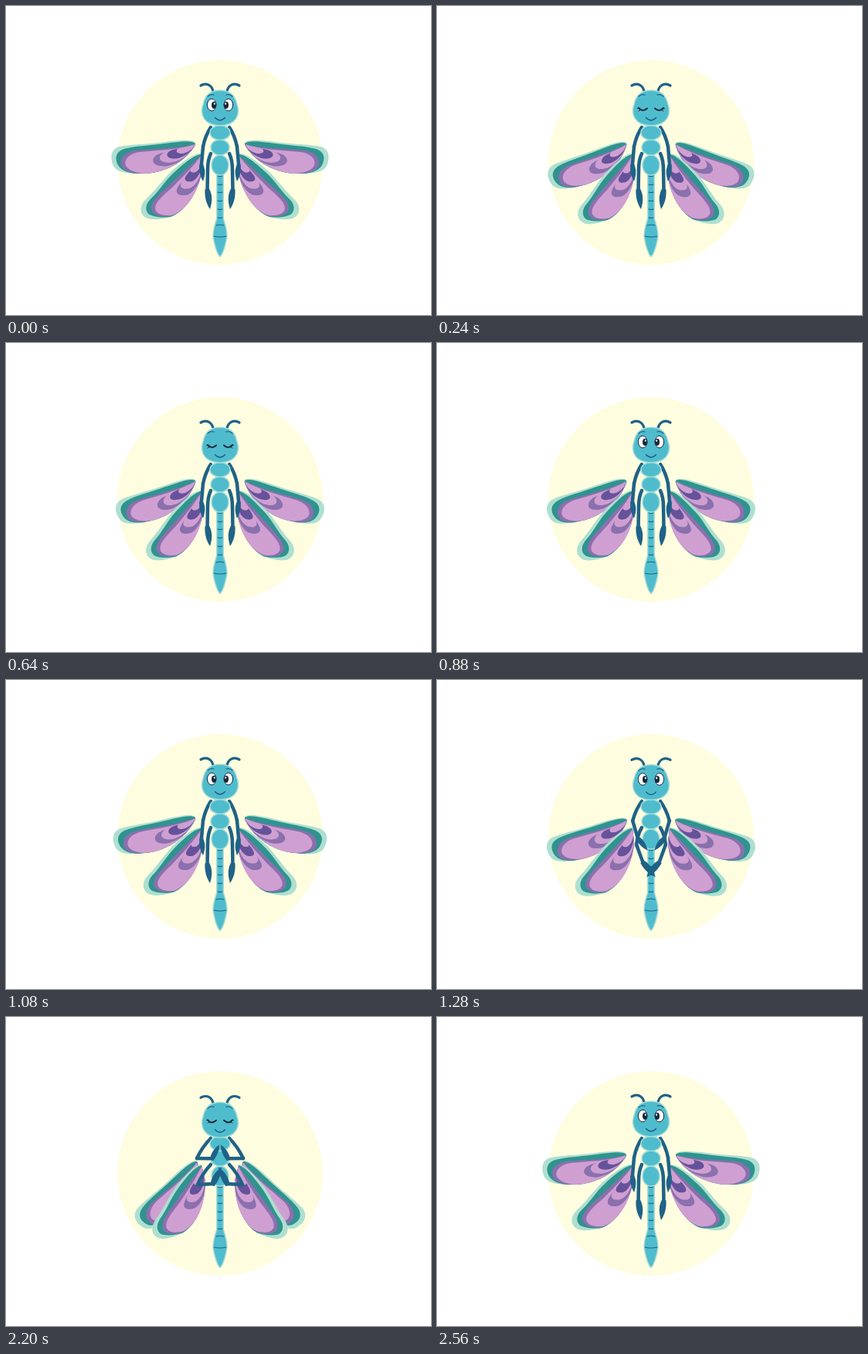
These frames come from a looping animation (550 px wide and 400 px high, 2.6 s). An HTML page with a canvas:

```html
<!DOCTYPE html>
<html>
<head>
<meta charset="utf-8">
<style>
html, body { margin: 0; width: 100%; height: 100%; overflow: hidden; background: #fff; }
canvas { display: block; }
</style>
</head>
<body>
<canvas id="stage" width="550" height="400"></canvas>
<script>
const ctx = document.getElementById('stage').getContext('2d');
const LOOP = 2600, STEP = 40, FLAP = 380, CLOSE = 1140, REST = 1600, OPEN = 2200;
const BLUE = '#4fbccd', PALE = '#a6dcd6', NAVY = '#1f6287', INK = '#17283c';
const MINT = '#aedfd0', TEAL = '#2f938f', MAUVE = '#8a70ad', LILAC = '#cf9fd2', VIOLET = '#66529a';

// Left wings; each is a stack of layers that share a root.
const upperWing = {
  root: [245, 178],
  layers: [
    [MINT, 'M245 177C240 172 222 174 205 176C185 179 160 179 147 182C134 186 135 198 139 207C143 215 157 217 170 217L182 217C210 215 234 199 245 180Z'],
    [TEAL, 'M245 178C239 173 224 176 205 178C185 181 166 181 153 185C141 189 141 198 145 206C149 213 158 216 168 217L182 217C210 215 234 199 245 180Z'],
    [MAUVE, 'M245 179C225 184 192 185 168 187C152 189 146 199 150 208C153 214 164 217 178 217C210 215 234 199 245 179Z'],
    [LILAC, 'M245 179C225 186 195 187 173 189C158 191 151 201 156 208C160 214 172 217 182 217C210 215 234 199 245 179Z']
  ]
};
const lowerWing = {
  root: [253, 192],
  layers: [
    [MINT, 'M253 191C243 190 228 202 214 214C201 227 192 240 181 250C172 259 173 269 181 274C188 278 202 276 213 273C233 266 249 239 254 211Z'],
    [TEAL, 'M253 192C244 192 230 204 217 216C205 227 198 240 187 250C178 259 181 269 188 271C196 274 206 274 213 273C233 266 249 239 254 211Z'],
    [MAUVE, 'M253 193C241 204 227 217 213 230C203 240 189 250 188 261C188 270 200 274 213 272C233 266 250 240 254 211Z'],
    [LILAC, 'M253 193C243 207 228 222 216 234C205 244 193 253 193 262C194 270 205 272 214 271C233 266 250 240 254 211Z']
  ]
};
for (const wing of [upperWing, lowerWing])
  wing.layers = wing.layers.map(([color, d]) => [color, new Path2D(d)]);
const bands = [[.63, MAUVE], [.53, LILAC], [.42, VIOLET], [.28, LILAC]];

const head = new Path2D('M277 110C290 110 296 117 298 127C303 140 297 154 277 154C257 154 251 140 256 127C258 117 264 110 277 110Z');
const tail = new Path2D('M273.5 214L273.5 275C271 284 268 291 269 300C271 311 274 320 277 323.5C280 320 283 311 285 300C286 291 283 284 280.5 275L280.5 214Z');
const hand = new Path2D('M-2 -2.5C5 -5 12 -5 22 -.5C14 3.5 6 4 -2 2.5Z');

const arms = [
  { shoulder: [265, 157], elbow: [[255, 182], [247, 183]], turn: [95, 1], length: [25, 20], palm: [85, -62], size: .92 },
  { shoulder: [265, 191], elbow: [[261, 212], [248, 217]], turn: [91, -3], length: [27, 20], palm: [83, -62], size: 1.1 }
];

const rad = deg => deg * Math.PI / 180;
const mix = ([a, b], k) => a + (b - a) * k;

function fill(path, color) {
  ctx.fillStyle = color;
  ctx.fill(path);
}

function line(d, color, width) {
  ctx.strokeStyle = color;
  ctx.lineWidth = width;
  ctx.stroke(new Path2D(d));
}

function oval(x, y, rx, ry, color, edge, width) {
  ctx.beginPath();
  ctx.ellipse(x, y, rx, ry, 0, 0, 7);
  ctx.fillStyle = color;
  ctx.fill();
  if (!edge) return;
  ctx.strokeStyle = edge;
  ctx.lineWidth = width;
  ctx.stroke();
}

function outlined(path) {
  ctx.strokeStyle = PALE;
  ctx.lineWidth = 3;
  ctx.stroke(path);
  fill(path, BLUE);
}

// Runs the drawing for the left side, then mirrored.
function both(draw) {
  draw();
  ctx.save();
  ctx.translate(554, 0);
  ctx.scale(-1, 1);
  draw();
  ctx.restore();
}

function around([x, y], deg, scale = 1) {
  ctx.translate(x, y);
  ctx.rotate(rad(deg));
  ctx.scale(scale, scale);
  ctx.translate(-x, -y);
}

function drawWing({ root, layers }, deg, dx, dy) {
  ctx.save();
  ctx.translate(dx, dy);
  around(root, -deg);
  for (const [color, path] of layers) fill(path, color);
  const pane = layers[3][1];
  ctx.clip(pane);
  for (const [scale, color] of bands) {
    ctx.save();
    around(root, -7, scale);
    fill(pane, color);
    ctx.restore();
  }
  ctx.restore();
}

function armPose(arm, k) {
  const [a, b] = arm.elbow;
  const elbow = [mix([a[0], b[0]], k), mix([a[1], b[1]], k)];
  const angle = rad(mix(arm.turn, k)), length = mix(arm.length, k);
  const wrist = [elbow[0] + length * Math.cos(angle), elbow[1] + length * Math.sin(angle)];
  return { elbow, wrist, palm: mix(arm.palm, k) };
}

function drawUpperArm(arm, k) {
  const { elbow } = armPose(arm, k);
  const [x, y] = arm.shoulder;
  line(`M${x} ${y}Q${(x + elbow[0]) / 2 - 2} ${(y + elbow[1]) / 2 - 2} ${elbow}`, NAVY, 4.5);
}

function drawForearm(arm, k) {
  const { elbow, wrist, palm } = armPose(arm, k);
  line(`M${elbow}L${wrist}`, NAVY, 4.5);
  ctx.save();
  ctx.translate(...wrist);
  ctx.rotate(rad(palm));
  ctx.scale(arm.size, arm.size);
  fill(hand, NAVY);
  ctx.restore();
}

function drawBody() {
  outlined(tail);
  for (const y of [220, 231, 241, 252, 263, 274]) line(`M274 ${y}Q277 ${y + 1} 280 ${y}`, NAVY, 1.1);
  line('M272 284Q277 282.5 282 284M269 298Q277 300 285 298', NAVY, 1.1);
}

function drawTorso() {
  for (const [y, rx, ry] of [[206, 11, 13], [183, 12, 10], [164, 13, 9.5]])
    oval(277, y, rx, ry, BLUE, PALE, 1.5);
}

function drawHead(closed, dy) {
  ctx.save();
  ctx.translate(0, dy);
  both(() => line('M268 110C266 102 259 99 252 103', NAVY, 3.2));
  outlined(head);
  both(() => {
    line('M261 117Q264 113.5 269 115', NAVY, 1.3);
    if (closed) {
      line('M261 132Q266 138 272 132.5', INK, 2);
      line('M261 132L259.5 132.5M263 134.5L261 136', INK, 1);
    } else {
      oval(266.2, 128, 5.8, 7.8, '#fff', INK, 1);
      oval(269, 128.3, 3, 4.6, INK);
      oval(269.8, 126.5, 1, 1.3, '#fff');
    }
  });
  line('M270.5 144.5Q277 151.5 283.5 144.5', NAVY, 1.4);
  ctx.restore();
}

function pose(t) {
  let flap = 0, fold = 0;
  if (t < CLOSE) {
    const phase = t % FLAP / FLAP;
    flap = 1 - Math.abs(1 - 2 * phase);
  } else if (t < OPEN) {
    fold = Math.min(1, (t - CLOSE) / (REST - CLOSE));
  } else {
    fold = Math.max(0, 1 - (t - OPEN) / 360);
  }
  const reach = Math.pow(t < OPEN ? fold * .95 : fold, 1.2);
  const blink = [200, 680].some(at => Math.abs(t - at) <= 40);
  return { flap, fold, reach, closed: blink || fold > .6 };
}

function draw(t) {
  const { flap, fold, reach, closed } = pose(t);
  ctx.fillStyle = '#fff';
  ctx.fillRect(0, 0, 550, 400);
  oval(277, 202.5, 133, 132.5, '#fffddf');
  both(() => {
    drawWing(upperWing, 19 * flap + 36 * fold, 2 * fold, 9 * fold);
    drawWing(lowerWing, 8 * flap + 11 * fold, 0, 0);
  });
  drawBody();
  both(() => arms.forEach(arm => drawUpperArm(arm, reach)));
  drawTorso();
  drawHead(closed, 1.3 * fold);
  both(() => arms.forEach(arm => drawForearm(arm, reach)));
}

ctx.lineCap = ctx.lineJoin = 'round';
const start = performance.now();
function tick() {
  const t = (performance.now() - start) % LOOP;
  draw(Math.floor(t / STEP) * STEP);
  requestAnimationFrame(tick);
}
tick();
</script>
</body>
</html>
```
